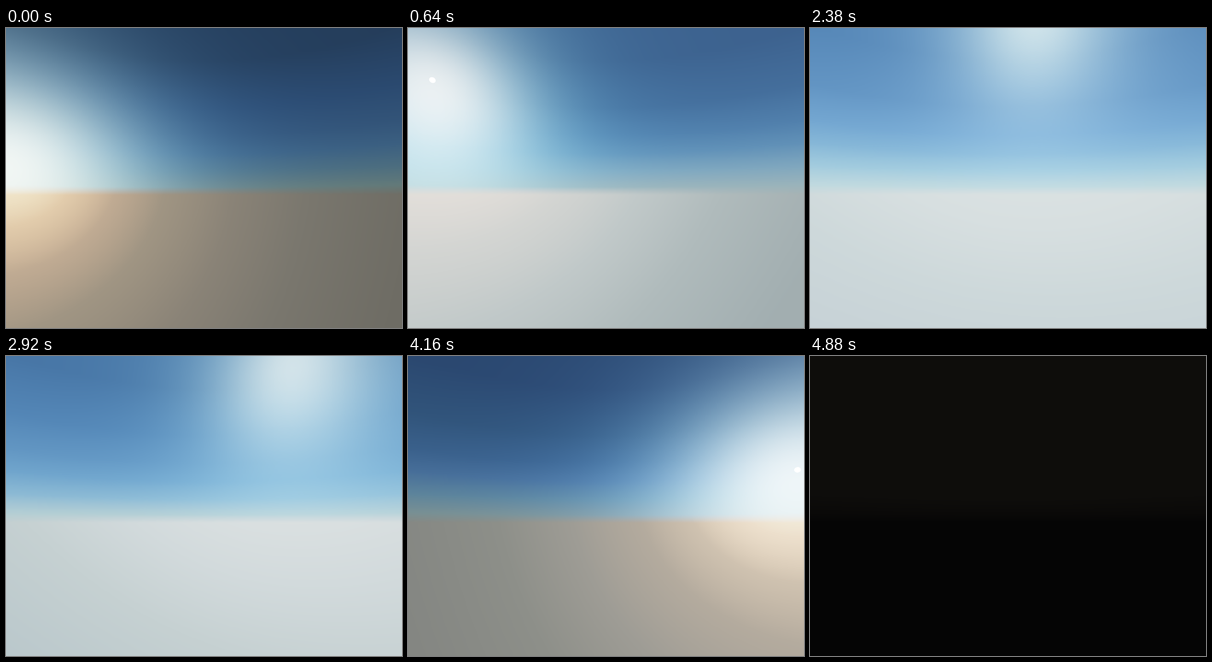
Write an HTML page with a canvas that moves like this. It is 860x651 px and loops after 5.22 s.

```html
<!DOCTYPE html>
<html lang="en">
<head>
<meta charset="utf-8">
<title>Sky from sunrise to night</title>
<style>
html, body { margin: 0; width: 100%; height: 100%; overflow: hidden; background: #050505; }
canvas { display: block; width: 860px; height: 651px; }
</style>
</head>
<body>
<canvas id="stage" width="860" height="651"></canvas>
<script>
const W = 860, H = 651, LOOP = 5220;
const FOCAL = 560, CX = 430, CY = 325, HORIZON = 362;
const DISC = 0.0084; // angular radius of the sun
const STEPS = [0, 160, 400, 640, 880, 1100, 1400, 1680, 1920, 2160, 2380,
  2620, 2920, 3220, 3440, 3680, 3920, 4160, 4400, 4640, 4880];

// time, x, y of the sun on the stage
const PATH = [[0, -11, 283], [640, 53, 113], [1400, 232, -30], [2380, 490, -78],
  [3680, 793, 129], [4160, 846, 247], [4400, 871, 306], [4640, 884, 362], [4880, 894, 415]];

const HEIGHTS = [0.03, 0.09, 0.16, 0.23, 0.34, 0.52]; // tangent of elevation
const ANGLES = [5, 12, 20, 30, 45, 60, 78];           // degrees from the sun

// Looks by height of the sun: y, sky by elevation, ground by angle, glow strength and spread
const LOOKS = [
  look(-78, 'c0d9de a2cbdd 85b6d6 72a5cf 6092c0 5384b4',
    'dfe4e4 dee4e4 dde4e4 dce3e3 d7dfe0 cdd8da c4cfd5', [14.2, 15.4, 11], [6.7, 7.1, 8.5]),
  look(-30, 'b7d1d6 8ebcd6 72a7ce 6498c4 5588b8 4877a7',
    'e0e2e2 e0e2e2 dfe2e2 dce2e3 d4dcde c8d3d4 bccace', [10.7, 11, 8.8], [7, 7.8, 9]),
  look(121, '98b1b8 7ea5bc 608fb5 507eaa 436c99 3c608c',
    'e8e2dc e6e1db e2ded9 d3d4d1 bfc7c7 aeb9ba a0acae', [8.3, 7.05, 5.8], [7.4, 9.5, 11]),
  look(247, '788e8e 5c8296 466c94 395e86 305276 2a466c',
    'f6f2e4 ecdfcc cfc2b0 b4ab9e 9e9c95 8d8f89 848682', [4.6, 4.7, 4.3], [10.8, 13, 16.5]),
  look(283, '627874 4b6b7a 3a5d7c 325274 2a486c 243c58',
    'f2e8ce e2ccac c0ab93 a09583 8a8377 7a776e 6e6c64', [4.67, 4.68, 3.77], [10.8, 13, 16.5]),
  look(364, '0a0908 0e0d0b 0e0d0b 0e0d0b 0e0d0b 0e0d0b',
    '050505 050505 050505 050505 050505 050505 050505', [0, 0, 0], [10.8, 13, 16.5])
];

// Colours are kept as light, shown as 1 - exp(-light)
function toLight(hex) {
  return [0, 2, 4].map(i => -Math.log(1 - parseInt(hex.substr(i, 2), 16) / 255));
}

function look(y, sky, ground, glow, spread) {
  return {
    y, glow, spread,
    sky: sky.split(' ').map(toLight),
    ground: ground.split(' ').map(toLight)
  };
}

const mix = (a, b, k) => Array.isArray(a) ? a.map((v, i) => mix(v, b[i], k)) : a + (b - a) * k;

// Index and fraction of v within ascending stops
function locate(stops, v) {
  const last = stops.length - 1;
  if (v <= stops[0]) return [0, 0];
  if (v >= stops[last]) return [last - 1, 1];
  let i = 0;
  while (v > stops[i + 1]) i++;
  return [i, (v - stops[i]) / (stops[i + 1] - stops[i])];
}

function sample(stops, values, v) {
  const [i, k] = locate(stops, v);
  return mix(values[i], values[i + 1], k);
}

function lookAt(y) {
  const [i, k] = locate(LOOKS.map(l => l.y), y);
  const out = {};
  for (const name of ['sky', 'ground', 'glow', 'spread']) {
    out[name] = mix(LOOKS[i][name], LOOKS[i + 1][name], k);
  }
  return out;
}

function slope(i, axis) {
  const a = PATH[Math.max(i - 1, 0)], b = PATH[Math.min(i + 1, PATH.length - 1)];
  return (b[axis] - a[axis]) / (b[0] - a[0]);
}

function sunAt(t) {
  const [i, k] = locate(PATH.map(p => p[0]), t);
  const a = PATH[i], b = PATH[i + 1], span = b[0] - a[0];
  const k2 = k * k, k3 = k2 * k;
  return [1, 2].map(n =>
    a[n] * (2 * k3 - 3 * k2 + 1) + b[n] * (3 * k2 - 2 * k3) +
    span * (slope(i, n) * (k3 - 2 * k2 + k) + slope(i + 1, n) * (k3 - k2)));
}

const ctx = document.getElementById('stage').getContext('2d');
const small = document.createElement('canvas');
small.width = W / 2;
small.height = Math.ceil(H / 2);
const smallCtx = small.getContext('2d');
const image = smallCtx.createImageData(small.width, small.height);

// Tables over the angle from the sun (0.1 degree) and the elevation (0.001)
const glowTable = new Float32Array(1801 * 3);
const groundTable = new Float32Array(1801 * 3);
const skyTable = new Float32Array(800 * 3);

function fillTables(l) {
  for (let i = 0; i <= 1800; i++) {
    const angle = i / 10, soft = Math.hypot(angle, 6);
    groundTable.set(sample(ANGLES, l.ground, angle), i * 3);
    for (let c = 0; c < 3; c++) glowTable[i * 3 + c] = l.glow[c] * Math.exp(-soft / l.spread[c]);
  }
  for (let i = 0; i < 800; i++) skyTable.set(sample(HEIGHTS, l.sky, i / 1000), i * 3);
}

function drawSky(sunX, sunY) {
  const sx = sunX - CX, sy = HORIZON - sunY;
  const sunLength = Math.hypot(sx, sy, FOCAL);
  const data = image.data;
  let p = 0;
  for (let row = 0; row < small.height; row++) {
    const y = HORIZON - (row * 2 + 1);
    for (let col = 0; col < small.width; col++) {
      const x = col * 2 + 1 - CX;
      const flat = x * x + FOCAL * FOCAL;
      const dot = (x * sx + y * sy + FOCAL * FOCAL) / (Math.sqrt(flat + y * y) * sunLength);
      const a = Math.round(Math.acos(Math.min(1, dot)) * 1800 / Math.PI) * 3;
      const v = Math.max(0, y / Math.sqrt(flat));
      const air = 1 / (1 + (v / 0.41) ** 2);
      const haze = Math.min(1, v / 0.03);
      const e = Math.min(799, Math.round(v * 1000)) * 3;
      for (let c = 0; c < 3; c++) {
        const ground = groundTable[a + c];
        const sky = skyTable[e + c] + glowTable[a + c] * air;
        data[p++] = 255 * (1 - Math.exp(-(ground + (sky - ground) * haze)));
      }
      data[p++] = 255;
    }
  }
  smallCtx.putImageData(image, 0, 0);
  ctx.imageSmoothingEnabled = true;
  ctx.drawImage(small, 0, 0, small.width * 2, small.height * 2);
}

function drawDisc(x, y) {
  const length = Math.hypot(x - CX, y - CY, FOCAL);
  const r = DISC * length;
  ctx.fillStyle = '#fff';
  ctx.beginPath();
  ctx.ellipse(x, y, r * length / FOCAL, r, Math.atan2(y - CY, x - CX), 0, Math.PI * 2);
  ctx.fill();
}

function draw(t) {
  const [x, y] = sunAt(t);
  fillTables(lookAt(y));
  drawSky(x, y);
  drawDisc(x, y);
}

const start = performance.now();
let shown = -1;

function tick() {
  const t = (performance.now() - start) % LOOP;
  let step = STEPS.length - 1;
  while (STEPS[step] > t) step--;
  if (step !== shown) {
    shown = step;
    draw(STEPS[step]);
  }
  requestAnimationFrame(tick);
}
tick();
</script>
</body>
</html>
```
